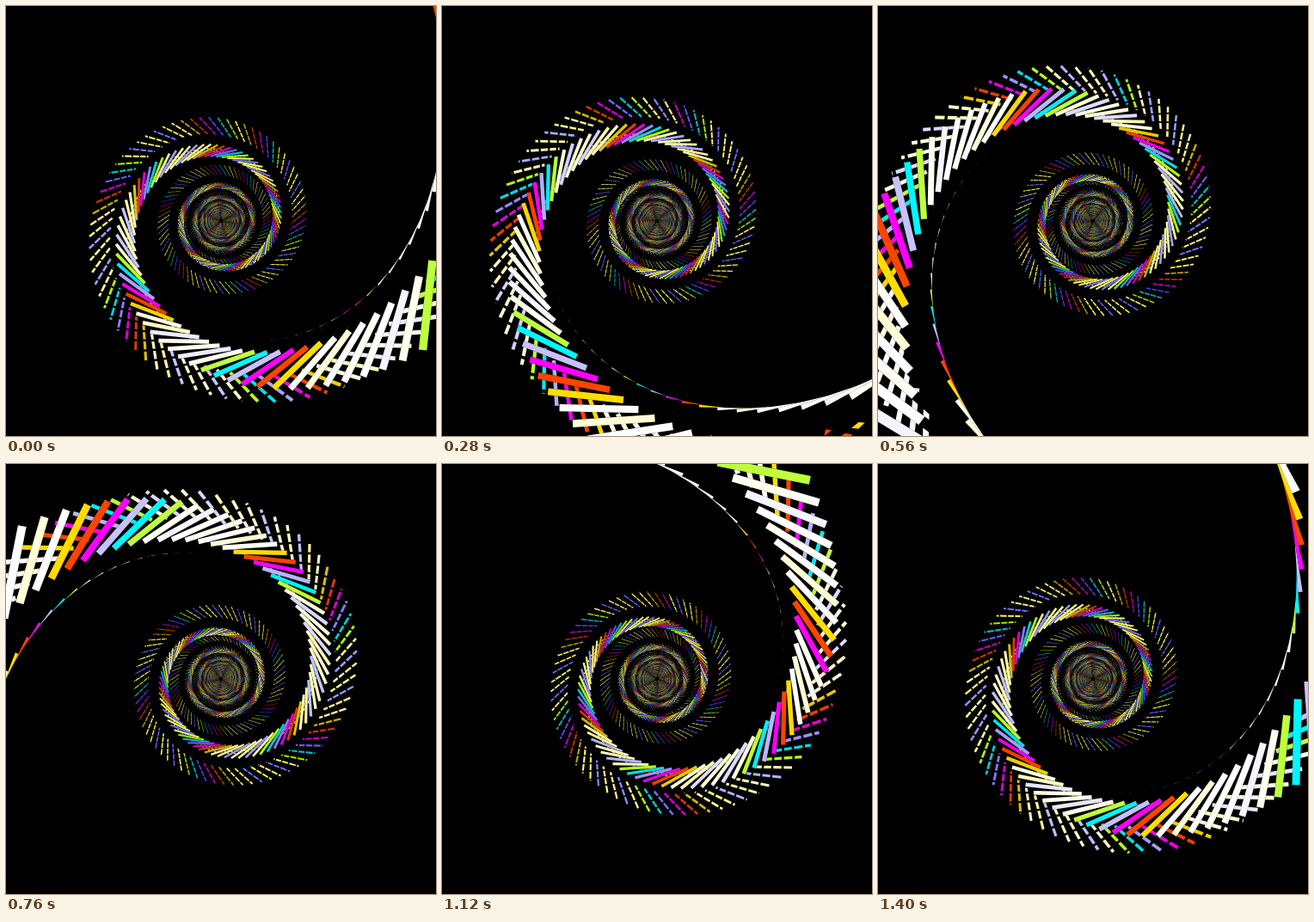
An HTML page with a canvas that plays this animation: 500 by 500 pixels, repeating every 1440 ms.

```html
<!DOCTYPE html>
<html>
<head>
<meta charset="utf-8">
<style>
html, body { margin: 0; height: 100%; overflow: hidden; background: #000; }
canvas { display: block; }
</style>
</head>
<body>
<canvas id="stage" width="500" height="500"></canvas>
<script>
const ctx = document.getElementById('stage').getContext('2d');
const LOOP = 1440, STEP = 40, BARS = 2200, PER_TURN = 72;
const RADIUS = 478, RAD = Math.PI / 180;
// Hue and lightness of successive bars
const palette = [[16, 50], [300, 50], [245, 88], [182, 50], [80, 62], [55, 97],
  [240, 98], [55, 100], [60, 98], [240, 100], [55, 92], [55, 100], [52, 50]];
const mod = (a, n) => ((a % n) + n) % n;

// One piece of a bar, measured along the tangent of the helix
function piece(color, from, to, width) {
  ctx.fillStyle = color;
  ctx.fillRect(RADIUS - width / 2, from, width, to - from);
}

function drawBar(index, time) {
  const angle = 5 * index + 2;
  const depth = (angle + 77.8 - 0.25 * time) * RAD;
  const turn = (angle - 25.8) * RAD;
  const c = Math.cos(turn) / depth, s = Math.sin(turn) / depth;
  const shade = Math.round(mod(index, PER_TURN) - 1.8 + 13 * time / LOOP);
  const [hue, light] = palette[mod(shade, palette.length)];
  const fade = 1 - Math.min(Math.max(depth - 3, 0) * 0.07, 0.3);
  const color = `hsl(${hue}, 100%, ${light * fade}%)`;
  const width = Math.max(20 - depth, 8);

  ctx.setTransform(c, s, -s, c, 250, 250);
  piece('#000', -763, 237, width);
  piece('#000', 237, 560, width / 2);
  for (const from of [-763, -363, 37]) piece(color, from, from + 200, width);
}

function frame(now) {
  const time = Math.floor((now % LOOP) / STEP) * STEP;
  ctx.setTransform(1, 0, 0, 1, 0, 0);
  ctx.fillStyle = '#000';
  ctx.fillRect(0, 0, 500, 500);
  // Far to near, so that close bars cover distant ones
  const nearest = Math.ceil((0.25 * time - 20) / 5);
  for (let i = nearest + BARS; i >= nearest; i--) drawBar(i, time);
}

const start = performance.now();
function tick() {
  frame(performance.now() - start);
  requestAnimationFrame(tick);
}
tick();
</script>
</body>
</html>
```
